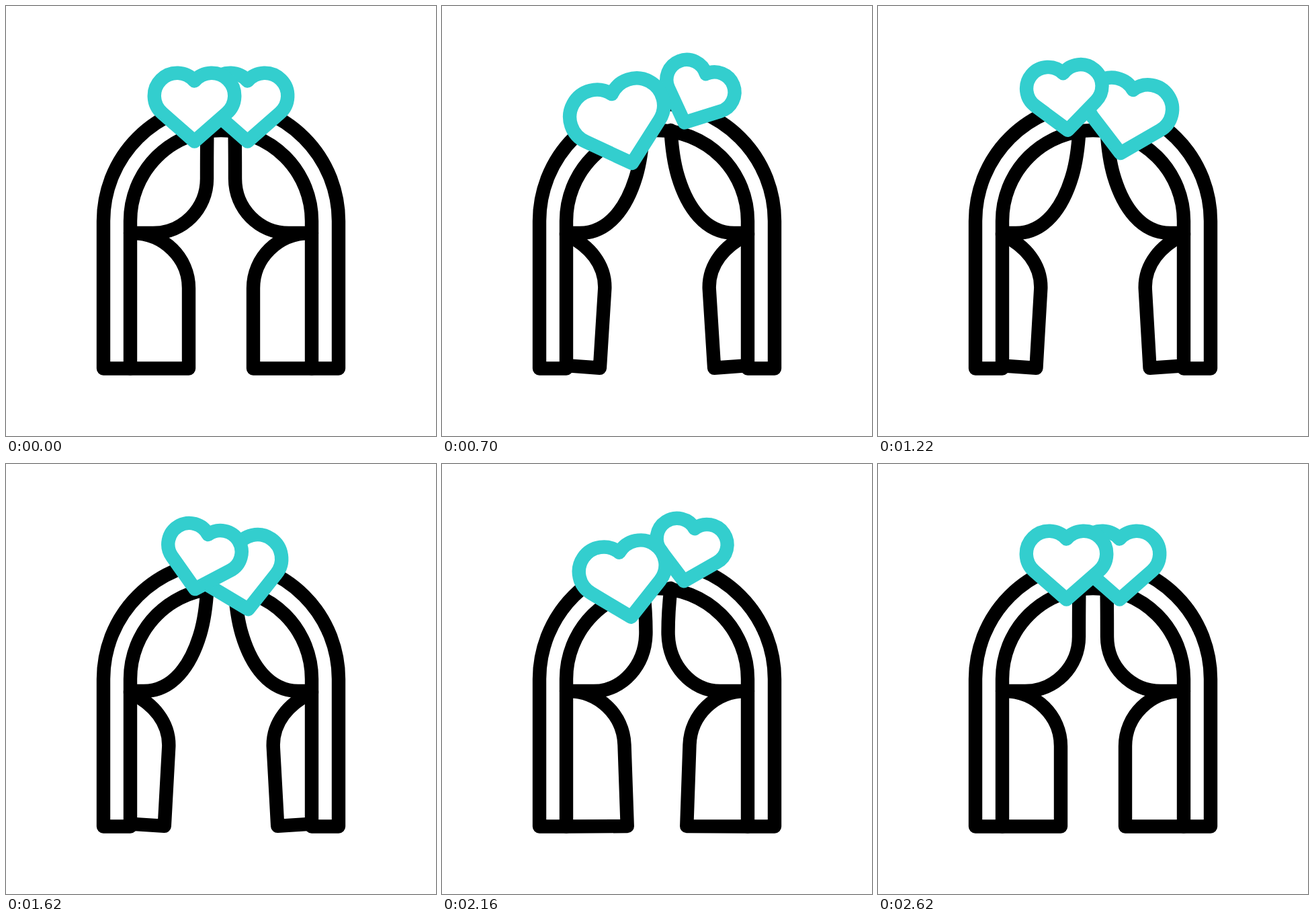
An HTML page for the animation above (3 s loop, 640 by 640 pixels).

```html
<!DOCTYPE html>
<html lang="en">
<head>
<meta charset="utf-8">
<title>Wedding arch</title>
<style>
  html, body { margin: 0; width: 100%; height: 100%; overflow: hidden; background: #fff; }
  svg { display: block; width: 100%; height: 100%; }
  path { fill: none; stroke: #000; stroke-width: 20.4; stroke-linejoin: round; stroke-linecap: round; }
  .heart { fill: #fff; stroke: #33cece; }
</style>
</head>
<body>
<svg viewBox="0 0 640 640">
  <g id="curtain">
    <path id="upper"/>
    <path id="lower"/>
  </g>
  <use href="#curtain" transform="matrix(-1 0 0 1 640 0)"/>
  <path d="M145 539.5V320A175 175 0 0 1 495 320V539.5H455V320A135 135 0 0 0 185 320V539.5Z"/>
  <path id="right" class="heart"/>
  <path id="left" class="heart"/>
</svg>
<script>
const LOOP = 3000;
const BASE = 539.5;
const $ = id => document.getElementById(id);
const lerp = (a, b, p) => a + (b - a) * p;
const smooth = u => u * u * (3 - 2 * u);
const brisk = u => smooth(u) + 0.45 * u * (1 - u) ** 2;

// Value of a keyed channel: quick start, soft turns, quick arrival.
function track(t, times, values) {
  const last = times.length - 1;
  if (t <= times[0]) return values[0];
  if (t >= times[last]) return values[last];
  const i = times.findIndex(k => k > t);
  const u = (t - times[i - 1]) / (times[i] - times[i - 1]);
  const e = i === 1 ? brisk(u) : i === last ? 1 - brisk(1 - u) : smooth(u);
  return lerp(values[i - 1], values[i], e);
}

const bobTimes = [220, 815, 1405, 2030, 2620];
const tiltTimes = [220, 920, 1560, 2180, 2620];
const curtainTimes = [220, 630, 1740, 2130, 2540];
const flareTimes = [220, 480, 1740, 2130, 2540];

const hearts = [
  { id: "left", x: 280.5, drift: [0, 3, 0.8, 1, 0], bob: [0, 35.5, -32.5, 29.5, 0],
    tilt: [0, -20.5, 14.2, -10.5, 0], size: [1, 1.209, 0.862, 1.096, 1] },
  { id: "right", x: 359.5, drift: [0, 1.5, 1, 0.5, 0], bob: [0, -30.5, 32, -30.5, 0],
    tilt: [0, 30, -11, 11.7, 0], size: [1, 0.869, 1.125, 0.872, 1] }
];

// Heart whose tip is the origin; the outline keeps its weight at any size.
function heartPath(s) {
  const r = 34 * s, x = 47.9 * s, y = -42 * s;
  return `M0 0L${-x} ${y}A${r} ${r} 0 1 1 0 ${-90 * s}A${r} ${r} 0 1 1 ${x} ${y}Z`;
}

function drawHeart(t, { id, x, drift, bob, tilt, size }) {
  const tipX = x + track(t, tiltTimes, drift);
  const tipY = 201.5 + track(t, bobTimes, bob);
  const path = $(id);
  path.setAttribute("d", heartPath(track(t, bobTimes, size)));
  path.setAttribute("transform",
    `translate(${tipX} ${tipY}) rotate(${track(t, tiltTimes, tilt)})`);
}

// Curve points of the curtain at rest, drawn aside and swung back.
const upper = {
  rest: [299, 209, 299, 233, 299, 257, 299, 302, 263, 338, 219, 338],
  drawn: [298, 210, 295, 233, 289, 253, 275, 300, 248, 338, 205, 338],
  swung: [302, 207, 303.5, 230, 303.5, 250, 303.5, 300, 268, 338, 226, 338]
};
const lower = {
  rest: [188, 338, 235, 338, 272, 375, 272, 420],
  drawn: [185, 340, 220, 357, 243, 385, 242.3, 420],
  swung: [188, 338, 233, 338, 270, 373, 271.5, 418]
};

const pose = (t, { rest, drawn, swung }) => rest.map((v, i) =>
  track(t, curtainTimes, [v, drawn[i], drawn[i], swung[i], v]));

function drawCurtain(t) {
  $("upper").setAttribute("d", `M299.5 185C${pose(t, upper).join(" ")}H185`);

  const [x, y, ...curve] = pose(t, lower);
  const flare = track(t, flareTimes, [0, -7.5, -6.5, 4.3, 0]);
  $("lower").setAttribute("d",
    `M${x} ${y}C${curve.join(" ")}L${curve[4] + flare} ${BASE - 0.1 * Math.abs(flare)}` +
    `L185 ${BASE + 0.6 * Math.min(flare, 0)}`);
}

function frame() {
  const t = performance.now() % LOOP;
  drawCurtain(t);
  hearts.forEach(heart => drawHeart(t, heart));
  requestAnimationFrame(frame);
}
frame();
</script>
</body>
</html>
```
